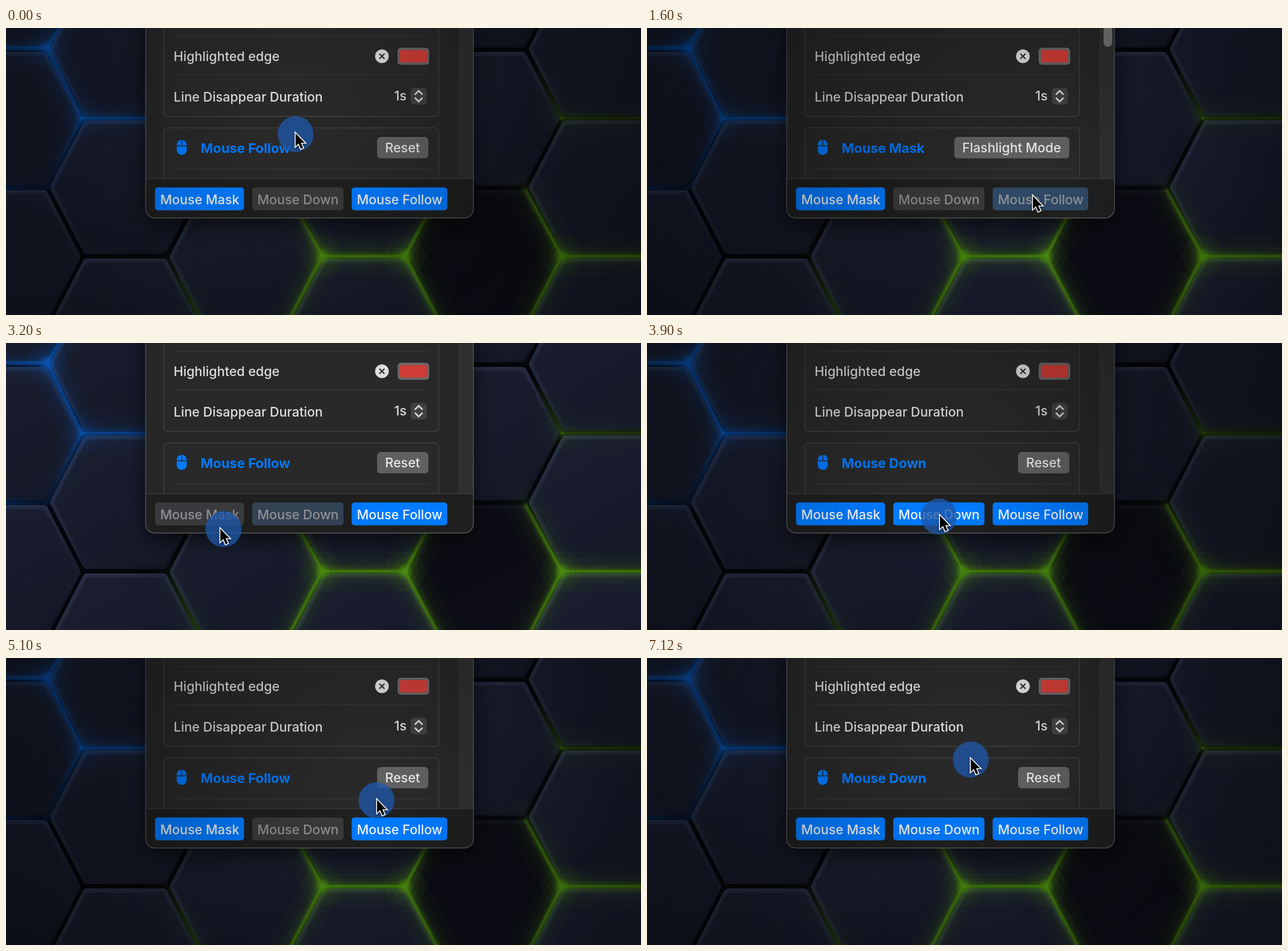
These frames come from a looping animation (1114 by 503 pixels, 7240 ms). An HTML page with a canvas:

```html
<!DOCTYPE html>
<html lang="en">
<head>
<meta charset="utf-8">
<title>Mouse settings</title>
<style>
html, body { margin: 0; width: 100%; height: 100%; overflow: hidden; background: #05060b; }
canvas { display: block; }
</style>
</head>
<body>
<canvas id="stage" width="1114" height="503"></canvas>
<script>
const W = 1114, H = 503, LOOP = 7240;
const BLUE = '#007aff';
const stage = document.getElementById('stage');
const backdrop = new OffscreenCanvas(W, H);
let ctx = backdrop.getContext('2d');

// Times at which each option is switched; the first entry is its state at 0.
const switches = {
  mask: [true, 2500, 3500],
  down: [false, 2750, 3000, 3900, 4200, 5600],
  follow: [true, 1500, 1900]
};
const CLICK = 6200;

// Pointer way points: time, x, y
const way = [
  [0, 506, 181], [600, 560, 215], [1300, 675, 291], [1900, 675, 291],
  [2500, 345, 300], [2700, 505, 302], [3000, 505, 302], [3200, 374, 322],
  [3500, 345, 306], [3900, 512, 299], [4200, 505, 297], [4500, 461, 137],
  [5100, 649, 245], [5500, 530, 300], [5700, 530, 300], [6150, 560, 201],
  [6400, 560, 201], [7100, 566, 173]
];

function pointerAt(t) {
  let i = 0;
  while (i < way.length - 2 && t >= way[i + 1][0]) i++;
  const [t0, x0, y0] = way[i], [t1, x1, y1] = way[i + 1];
  const u = Math.min(1, Math.max(0, (t - t0) / (t1 - t0)));
  const s = u * u * (3 - 2 * u);
  return [x0 + (x1 - x0) * s, y0 + (y1 - y0) * s];
}

function optionAt(name, t) {
  const [start, ...times] = switches[name];
  const past = times.filter(s => s <= t);
  return { on: start !== (past.length % 2 === 1), age: past.length ? t - past.at(-1) : Infinity };
}

function box(x, y, w, h, r, fill, stroke, width = 1.5) {
  ctx.beginPath();
  ctx.roundRect(x, y, w, h, r);
  if (fill) { ctx.fillStyle = fill; ctx.fill(); }
  if (stroke) { ctx.strokeStyle = stroke; ctx.lineWidth = width; ctx.stroke(); }
}

function line(points, color, width) {
  ctx.beginPath();
  points.forEach(p => ctx.lineTo(...p));
  ctx.strokeStyle = color;
  ctx.lineWidth = width;
  ctx.stroke();
}

function disc(x, y, r, color) {
  ctx.beginPath();
  ctx.arc(x, y, r, 0, 7);
  ctx.fillStyle = color;
  ctx.fill();
}

function ring(x, y, r, color) {
  ctx.beginPath();
  ctx.arc(x, y, r, 0, 7);
  ctx.strokeStyle = color;
  ctx.lineWidth = 4.5;
  ctx.stroke();
}

function text(str, x, y, color = '#dfdfdf', font = '500 22.8px') {
  ctx.font = `${font} Inter, sans-serif`;
  ctx.fillStyle = color;
  ctx.fillText(str, x, y);
}

// Wallpaper

function hexPath(cx, cy, inset) {
  const k = 1 - inset / 121;
  ctx.beginPath();
  for (const [x, y] of [[-74, -121], [74, -121], [137, 0], [74, 121], [-74, 121], [-137, 0]])
    ctx.lineTo(cx + x * k, cy + y * k);
  ctx.closePath();
}

function hexLayer(cx, cy, inset, colors) {
  const paint = ctx.createLinearGradient(cx - 70, cy - 121, cx + 70, cy + 121);
  colors.forEach((c, i) => paint.addColorStop(i / (colors.length - 1), c));
  hexPath(cx, cy, inset + 8);
  ctx.fillStyle = ctx.strokeStyle = paint;
  ctx.lineWidth = 16;
  ctx.fill();
  ctx.stroke();
}

function hexagon(cx, cy) {
  const dark = cx === 839 && cy === 401;
  hexLayer(cx, cy, 4, dark ? ['#13151d', '#0d0f16', '#090a10'] : ['#2b3147', '#20263a', '#0f121c']);
  hexLayer(cx, cy, 7, dark ? ['#10121a', '#0b0c13'] : ['#262c40', '#1c2133', '#111420']);
  hexLayer(cx, cy, 11, dark ? ['#0b0c12', '#0d0e17'] : ['#1a1e2e', '#171b2b', '#141826']);
}

// Light in a groove, fading from strength a to strength b.
function glow(x0, y0, x1, y1, rgb, a, b = a) {
  for (const [width, k] of [[70, .04], [46, .05], [28, .08], [17, .14], [9, .3], [5, .65]]) {
    const paint = ctx.createLinearGradient(x0, y0, x1, y1);
    paint.addColorStop(0, `rgba(${rgb},${a * k})`);
    paint.addColorStop(1, `rgba(${rgb},${b * k})`);
    line([[x0, y0], [x1, y1]], paint, width);
  }
}

// Small flare where three grooves meet.
function flare(x, y, rgb) {
  const paint = ctx.createRadialGradient(x, y, 0, x, y, 14);
  paint.addColorStop(0, `rgba(${rgb},.8)`);
  paint.addColorStop(1, `rgba(${rgb},0)`);
  disc(x, y, 14, paint);
}

function paintWallpaper() {
  ctx.fillStyle = '#05060b';
  ctx.fillRect(0, 0, W, H);
  ctx.lineJoin = 'round';
  for (let col = 0; col < 6; col++)
    for (let row = -1; row < 3; row++)
      hexagon(-1 + 210 * col, 159 + 242 * row - (col % 2 ? 122 : 0));

  const blue = '10,82,175', green = '74,138,14';
  ctx.lineCap = 'round';
  glow(0, 35, 72, 35, blue, .7, 1);
  glow(72, 35, 93, 0, blue, 1, .8);
  glow(72, 35, 133, 158, blue, 1, .75);
  glow(133, 158, 283, 158, blue, .9, .7);
  glow(133, 158, 72, 280, blue, .6, .15);
  glow(0, 280, 72, 280, blue, .35, .1);
  glow(490, 280, 555, 400, green, .4, 1);
  glow(555, 400, 700, 400, green, 1);
  glow(700, 400, 765, 280, green, 1, .3);
  glow(555, 400, 492, 520, green, 1, .8);
  glow(700, 400, 765, 522, green, 1, .75);
  glow(283, 400, 346, 522, green, .05, .4);
  glow(912, 285, 975, 400, green, .5, 1);
  glow(975, 400, 1120, 400, green, 1, .9);
  glow(975, 400, 912, 522, green, 1, .65);
  glow(975, 158, 1120, 158, green, .35, .3);
  glow(975, 158, 925, 62, green, .3, 0);
  ctx.lineCap = 'butt';
  flare(72, 35, blue);
  for (const x of [555, 700, 975]) flare(x, 400, green);
}

// Settings panel

function paintPanel() {
  ctx.save();
  ctx.shadowColor = 'rgba(0,0,0,.65)';
  ctx.shadowBlur = 38;
  ctx.shadowOffsetY = 10;
  box(245, -40, 575, 373, 16, '#272727');
  ctx.restore();

  ctx.save();
  ctx.beginPath();
  ctx.rect(245, 0, 575, 264);
  ctx.clip();
  box(277, -40, 482, 195, 7, '#29292a', '#404041');
  box(277, 175, 482, 150, 7, '#29292a', '#404041');
  for (const y of [15, 82, 247]) line([[294, y], [742, y]], '#363637', 1.5);
  ctx.fillStyle = '#2f2f2f';
  ctx.fillRect(795, 0, 25, 264);
  line([[795, 0], [795, 264]], '#3b3b3b', 1);
  ctx.restore();

  box(245, 264, 575, 69, [0, 0, 16, 16], '#1e1f1e');
  line([[245, 264], [820, 264]], '#3b3b3b', 1.5);
  box(245, -40, 575, 373, 16, null, '#5a5b5b', 1.3);

  text('Highlighted edge', 294, 58);
  text('Line Disappear Duration', 294, 128.5);
  text('1s', 681, 127);

  disc(659.5, 49.5, 12, '#dedede');
  line([[655, 45], [664, 54]], '#292929', 2.2);
  line([[664, 45], [655, 54]], '#292929', 2.2);
  box(688, 35.5, 53.5, 28, 5, '#636364', '#767677');
  box(691, 38.5, 47.5, 22, 3, '#cf3d36');

  box(710, 105, 28, 29, 6, '#424243');
  ctx.lineCap = 'round';
  line([[718, 116], [724, 110], [730, 116]], '#dedede', 2.6);
  line([[718, 123], [724, 129], [730, 123]], '#dedede', 2.6);
  ctx.lineCap = 'butt';

  box(299.5, 196, 17.5, 26.5, 8.5, BLUE);
  line([[299, 206.5], [318, 206.5]], '#29292a', 1.6);
  line([[308.3, 196], [308.3, 206]], '#29292a', 1.6);
}

function paintSection(options) {
  const name = options.down.on ? 'Mouse Down' : options.follow.on ? 'Mouse Follow' : 'Mouse Mask';
  text(name, 341.5, 219, BLUE, '700 23.4px');
  const wide = name === 'Mouse Mask';
  const x = wide ? 539 : 651;
  box(x, 191.5, 741 - x, 37, 6, '#606061');
  line([[x + 5, 192], [736, 192]], '#777', 1);
  text(wide ? 'Flashlight Mode' : 'Reset', x + 14, 217.5, '#e8e8e8');
  if (wide) box(801, -30, 15, 63, 7.5, '#747474');
}

function paintOption(label, x, w, { on, age }) {
  box(x, 279.5, w, 40, 5, '#3a3a3b');
  ctx.globalAlpha = on ? 1 : .35 * Math.exp(-age / 200);
  box(x, 279.5, w, 40, 5, BLUE);
  ctx.globalAlpha = 1;
  text(label, x + 9, 308.5, on ? '#f4f4f4' : '#8f9092');
}

// Pointer effects

function paintMask(x, y) {
  const shade = ctx.createRadialGradient(x, y, 0, x, y, 750);
  for (const [r, alpha] of [[60, 0], [250, .13], [450, .27], [750, .45]])
    shade.addColorStop(r / 750, `rgba(0,0,0,${alpha})`);
  ctx.fillStyle = shade;
  ctx.fillRect(0, 0, W, H);
}

function paintClick(x, y, age) {
  if (age < 0 || age >= 400) return;
  ctx.globalAlpha = 1 - age / 400;
  ring(x, y, 30, '#1873ea');
  ring(x, y, 31 + age * .08, '#1b5fc0');
  ctx.globalAlpha = 1;
}

function paintPointer(x, y) {
  ctx.save();
  ctx.translate(x + 2, y + 3.5);
  ctx.scale(.88, .88);
  ctx.beginPath();
  for (const p of [[0, 0], [0, 26], [6, 20.5], [10.5, 31], [15, 29], [10.5, 19], [18.5, 19]])
    ctx.lineTo(...p);
  ctx.closePath();
  ctx.shadowColor = 'rgba(0,0,0,.5)';
  ctx.shadowBlur = 4;
  ctx.shadowOffsetY = 2;
  ctx.lineJoin = 'miter';
  ctx.lineWidth = 3.6;
  ctx.strokeStyle = '#fff';
  ctx.stroke();
  ctx.shadowColor = 'transparent';
  ctx.fillStyle = '#000';
  ctx.fill();
  ctx.restore();
}

function draw(t) {
  const options = {};
  for (const name in switches) options[name] = optionAt(name, t);
  const [x, y] = pointerAt(t);
  const [lagX, lagY] = pointerAt(t - 25);

  ctx.drawImage(backdrop, 0, 0);
  paintPanel();
  paintSection(options);
  paintOption('Mouse Mask', 261.5, 156, options.mask);
  paintOption('Mouse Down', 432, 160, options.down);
  paintOption('Mouse Follow', 606.5, 167.5, options.follow);
  if (options.mask.on) paintMask(x, y);
  if (options.follow.on) disc(lagX + 2, lagY + 5, 31.5, 'rgba(30,86,168,.78)');
  paintClick(lagX + 1.5, lagY + 4, t - CLICK);
  paintPointer(x, y);
}

paintWallpaper();
ctx = stage.getContext('2d');

function tick() {
  draw(Math.floor(performance.now() % LOOP / 100) * 100);
  requestAnimationFrame(tick);
}
tick();
</script>
</body>
</html>
```
